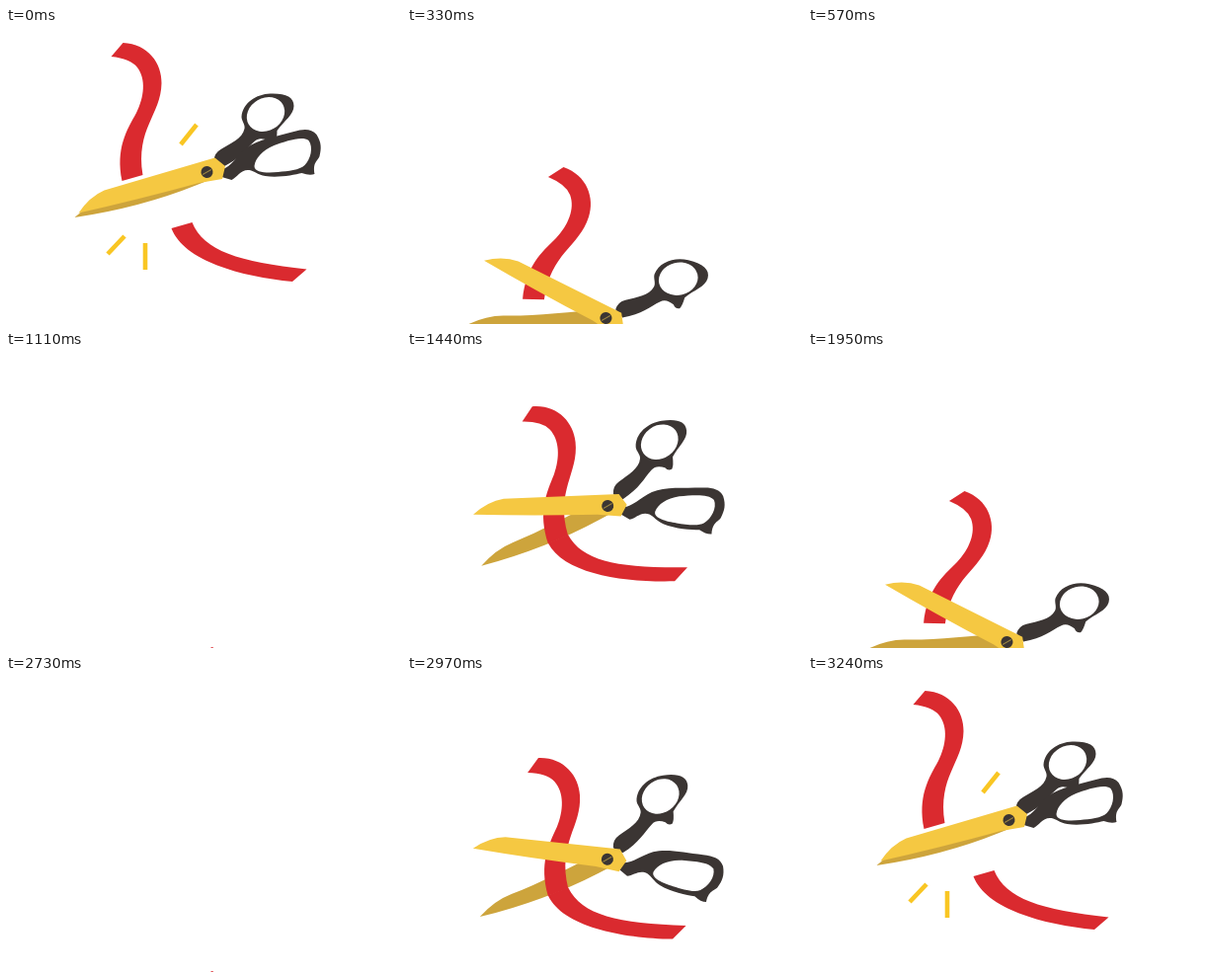
Animation, 400 px wide and 300 px high, one loop 3.27 s. Source, as an HTML page with a canvas:

```html
<!DOCTYPE html>
<html lang="en">
<head>
<meta charset="utf-8">
<title>Ribbon cutting</title>
<style>
  html, body { margin: 0; height: 100%; overflow: hidden; background: #fff; }
  canvas { display: block; }
</style>
</head>
<body>
<canvas id="stage" width="400" height="300"></canvas>
<script>
const ctx = document.getElementById('stage').getContext('2d');
const LOOP = 3270, CYCLE = 1620, STEP = 30;
const RED = '#da2a2f', GOLD = '#f5c842', SHADE = '#cda43c', DARK = '#3b3533', SPARK = '#f9c623';

// Scissor parts are relative to the screw, ribbon halves to the middle of their cut edge.
const backBlade = new Path2D('M-134 46Q-118 31-100 26C-70 18-40 5 0-10L10 5L-10 13Q-67 36-134 46Z');
const frontBlade = new Path2D('M-130 41.5Q-119 25-104 18.5L8-14.5L18.5-6L15.5 7L-8 11Q-70 28-130 41.5Z');
const backHandle = new Path2D(
  'M7-11Q7-19 14-23C24-29 36-34 38-44C39-48 35-52 35-56C36-70 50-79 64-79.5' +
  'C80-80 88-76 88-67C88-58 78-52 71-42Q71-33 69-30Q65-28 62-32C57-34 52-35 48-31C40-24 34-14 16-5Z');
backHandle.ellipse(59.5, -58.5, 20, 16.5, -0.52, 0, 7);
const frontHandle = new Path2D(
  'M16-3C24-5 30-16 40-24.5C52-33 70-36 88-41C98-44 106-44 111-38C116-30 116-24 114-16' +
  'C112-11 107-10 109 2Q104 4 96 1C88 3 72 6 59 4C52 3 48-1 43-2C34-3 31 5 25 8L15 5Z' +
  'M48-6C49-14 56-22 68-27C80-31 96-37 103-32C108-25 105-13 99-7C94-2 82-1 72 0C62 1 48 1 48-6Z');
const upperRibbon = new Path2D(
  'M-21.5-123L-9.5-137C16-136 30-116 29.5-96C29-64 3-50 10.5-3L-10.5 3' +
  'C-17-30-6-48 4-66C12-82 14-100 5-112Q-2-121-21.5-123Z');
const lowerRibbon = new Path2D('M10.5-3C22 26 58 37 126.5 44.5L112 57C60 52 2 36-10.5 3Z');
const sparks = [[177, 118, 193, 98], [120, 211, 103, 229], [141, 218, 141, 245]];

const clamp = x => Math.min(1, Math.max(0, x));
const span = (t, from, to) => clamp((t - from) / (to - from));
const smooth = x => x * x * (3 - 2 * x);

function pose(t) {
  if (t < CYCLE / 2) {
    const fall = (t / 330) ** 1.53;
    return {
      scissorY: 148 * fall, scissorTurn: 29.5 * fall, open: 27 * smooth(span(t, 0, 330)),
      ribbonY: 123 * fall, ribbonTurn: 16.8 * fall, split: 1,
      sparkFrom: span(t, 0, 150), sparkTo: 1
    };
  }
  const left = clamp((CYCLE - t) / 540);
  return {
    scissorY: 420 * left ** 3.4, scissorTurn: 34 * left ** 2,
    open: 27.7 * (1 - smooth(span(t, 1380, 1560))),
    ribbonY: 291 * left ** 2.76,
    ribbonTurn: t < 1440 ? 35 * ((1440 - t) / 330) ** 2 - 7 : 7 * smooth(span(t, 1440, CYCLE)) - 7,
    split: 1 - (1 - span(t, 1470, CYCLE)) ** 2,
    sparkFrom: 0, sparkTo: span(t, 1500, CYCLE)
  };
}

function at(x, y, degrees, draw) {
  ctx.save();
  ctx.translate(x, y);
  ctx.rotate(degrees * Math.PI / 180);
  draw();
  ctx.restore();
}

function fill(path, color) {
  ctx.fillStyle = color;
  ctx.fill(path, 'evenodd');
}

function line(x1, y1, x2, y2, color, width) {
  ctx.strokeStyle = color;
  ctx.lineWidth = width;
  ctx.beginPath();
  ctx.moveTo(x1, y1);
  ctx.lineTo(x2, y2);
  ctx.stroke();
}

function drawScrew() {
  ctx.fillStyle = DARK;
  ctx.beginPath();
  ctx.arc(0, 0, 6, 0, 7);
  ctx.fill();
  line(-5, 0, 5, 0, '#9a8442', 1);
}

function render(t) {
  const p = pose(t);
  ctx.fillStyle = '#fff';
  ctx.fillRect(0, 0, 400, 300);

  const pivotX = 203.5 - 0.07 * p.scissorTurn, pivotY = 146 + p.scissorY;
  at(pivotX, pivotY, p.scissorTurn - p.open / 2, () => {
    fill(backBlade, SHADE);
    fill(backHandle, DARK);
  });

  const dx = 25 * p.split, dy = 24 * p.split, cutY = 176 + p.ribbonY;
  const overlap = p.split ? 0 : 0.6;
  at(153 - dx, cutY - dy, p.ribbonTurn, () => fill(upperRibbon, RED));
  at(153 + dx, cutY + dy - overlap, p.ribbonTurn, () => fill(lowerRibbon, RED));

  at(pivotX, pivotY, p.scissorTurn + p.open / 2, () => {
    fill(frontHandle, DARK);
    fill(frontBlade, GOLD);
  });
  at(pivotX, pivotY, -30, drawScrew);

  if (p.sparkTo > p.sparkFrom) {
    for (const [x, y, ex, ey] of sparks) {
      const px = k => x + (ex - x) * k, py = k => y + (ey - y) * k;
      line(px(p.sparkFrom), py(p.sparkFrom), px(p.sparkTo), py(p.sparkTo), SPARK, 4.6);
    }
  }
}

function tick() {
  const now = performance.now() % LOOP;
  render(Math.floor(now / STEP) * STEP % CYCLE);
  requestAnimationFrame(tick);
}
tick();
</script>
</body>
</html>
```
